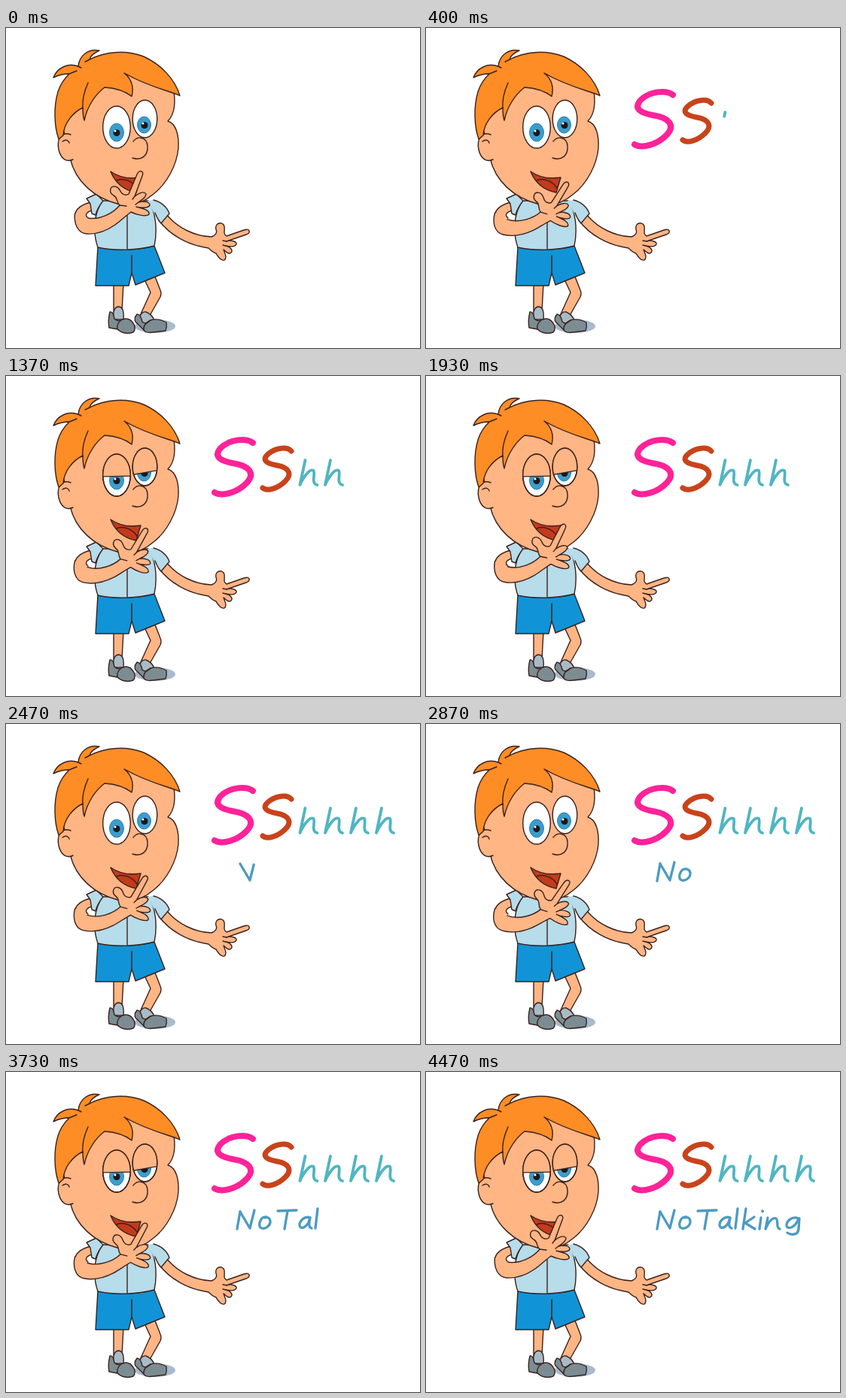
Recreate the animation shown at these times as an HTML page. Size 550 px wide and 426 px high, loop 4970 ms.

```html
<!DOCTYPE html>
<html lang="en">
<head>
<meta charset="utf-8">
<title>Sshhhh, no talking</title>
<style>
html, body { margin: 0; width: 100%; height: 100%; overflow: hidden; background: #fff; }
svg { display: block; width: 100%; height: 100%; }
.line { stroke: #3b211c; stroke-width: 1.4; stroke-linecap: round; stroke-linejoin: round; fill: none; }
.line .skin { fill: #ffb584; }
.line .hair { fill: #ff8d25; }
.line .shirt { fill: #b7dcea; }
.line .shorts { fill: #1193d7; }
.line .shoe { fill: #7b8d93; }
.line .sock { fill: #a9bcc6; }
.line .white { fill: #fff; }
.iris { fill: #3b9dcd; stroke: #2b7fae; stroke-width: 1; }
.pupil { fill: #1c1718; stroke: none; }
.glint { fill: #fff; stroke: none; }
#writing { fill: none; stroke-linecap: round; stroke-linejoin: round; }
</style>
</head>
<body>
<svg viewBox="0 0 550 426" role="img" aria-label="Sshhhh No Talking">
  <defs>
    <clipPath id="eyeL"><ellipse cx="147" cy="132" rx="18.3" ry="28"/></clipPath>
    <clipPath id="eyeR"><ellipse cx="184.5" cy="121" rx="16.3" ry="25"/></clipPath>
  </defs>

  <ellipse cx="198" cy="397" rx="27" ry="9" fill="#a9bace"/>

  <g class="line">
    <!-- legs and shoes -->
    <path class="skin" d="M143 340V377H154L156 340Z"/>
    <path class="skin" d="M184 335L192 352 178 383 188 388 205 358Q207 353 205 349L198 331Z"/>
    <path class="sock" d="M143 388C142 379 143 372 149 371C155 371 157 377 156 388Z"/>
    <path class="shoe" d="M138 378C136 386 136 394 137 399L148 401C153 406 162 408 169 405C172 402 172 397 169 393C165 387 160 386 155 388C150 391 147 390 144 387C143 382 142 377 138 378Z"/>
    <path d="M148 401C147 396 149 392 153 389"/>
    <path class="sock" d="M177 387C178 381 182 377 186 378C191 380 195 384 197 389L184 396Z"/>
    <path class="shoe" d="M174 381C171 385 170 388 172 391L183 402C185 406 190 406 196 405L212 403Q214 398 213 392C206 388 198 387 192 389C188 393 184 394 181 391C180 386 178 381 174 381Z"/>
    <path d="M183 402C182 396 186 392 192 389"/>

    <!-- pointing arm -->
    <path class="skin" d="M214 249C228 266 250 277 273 278C278 276 281 273 279 268C277 259 288 257 290 264C291 270 288 274 293 277L316 269C325 266 325 273 319 275L293 284C299 282 307 284 306 288C304 292 298 291 292 290C298 291 302 296 299 299C296 302 293 298 289 295C291 300 294 306 290 309C284 310 281 303 279 300C275 299 272 296 269 293C241 289 217 275 203 256Z"/>
    <path d="M293 284L288 283M292 290L288 289"/>

    <!-- clothes -->
    <path class="shorts" d="M122 291C145 297 175 296 197 290L211 326 172 342 167 326 163 343H119Z"/>
    <path d="M167 303V326"/>
    <path class="skin" d="M113 232C100 235 92 241 91.5 250L109 254C104 249 107 245 114 243Z" stroke="none"/>
    <path d="M113 232C100 235 92 241 91.5 250M109 253C104 249 107 245 114 243"/>
    <path class="shirt" d="M128 230C115 250 116 275 122 292C145 297 175 296 197 290C201 272 200 245 189 230Z"/>
    <path d="M161 235V294"/>
    <path class="shirt" d="M120 221L107 227 112 234 114 247 119 249C121 241 125 235 129 230Z"/>
    <path class="shirt" stroke="none" d="M188 230L196 229C205 231 214 238 217 247L206 260 199 251Z"/>
    <path d="M196 229C205 231 214 238 217 247L206 260C202 256 200 251 198 246"/>

    <!-- head -->
    <path class="skin" d="M222 78C226 99 224 115 215 124C226 127 230 143 229 160C227 182 214 207 196 221C182 233 166 239 148 234C117 226 92 204 85 173L74 125L103 65L170 50Z"/>
    <path class="skin" d="M86 142C74 137 67 148 70 162C73 175 81 179 89 175"/>
    <path d="M75 151C79 148 83 149 84 153"/>
    <path class="hair" d="M70 148C64 131 63 105 69 85C72 75 77 68 84 61C76 61 69 63 63 66C68 53 82 46 96 51C97 38 108 27 124 30C117 33 112 38 111 42C132 31 160 29 183 38C205 48 224 67 231 90C219 84 190 79 157 60C167 68 170 79 167 91C158 84 145 80 131 79C119 88 108 104 104 123C102 117 102 112 102 106C88 113 77 127 76 143Z"/>
    <path d="M109 73C104 84 101 95 102 107M84 61L94 57M96 51L100 53M111 42L105 45"/>

    <!-- eyes -->
    <ellipse class="white" cx="147" cy="132" rx="18.3" ry="28"/>
    <ellipse class="white" cx="184.5" cy="121" rx="16.3" ry="25"/>
    <ellipse class="iris" cx="147" cy="139" rx="9.5" ry="12"/>
    <ellipse class="iris" cx="183.5" cy="129" rx="9" ry="11"/>
    <circle class="pupil" cx="147" cy="139.500" r="4.500"/>
    <circle class="pupil" cx="184" cy="129.500" r="4.500"/>
    <circle class="glint" cx="145" cy="137" r="1.500"/>
    <circle class="glint" cx="182" cy="127" r="1.500"/>
    <g id="lids">
      <path class="skin" clip-path="url(#eyeL)" d="M120 100H175V133L120 134Z"/>
      <path class="skin" clip-path="url(#eyeR)" d="M160 90H210V124L160 133Z"/>
      <ellipse cx="147" cy="132" rx="18.3" ry="28"/>
      <ellipse cx="184.5" cy="121" rx="16.3" ry="25"/>
    </g>

    <path class="skin" d="M169 151C175 143 187 145 188 157C189 170 180 177 168 173"/>
    <path fill="#c43a1b" d="M139 191C150 199 165 201 179 199L173 219C157 216 145 206 139 191Z"/>
    <path d="M147 203C157 199 168 204 174 213"/>

    <!-- forearm swinging at the elbow -->
    <g id="arm">
      <path class="skin" d="M91.500 247C90 260 95 273 107 274C122 275 135 269 145 262C152 257 159 250 166 245C172 248 186 252 190 248C191 243 184 241 177 239C182 239 190 240 191 236C191 231 182 230 176 232C180 229 186 226 186 221C184 217 177 219 171 224L181 197C184 190 177 188 174 195L163 221C160 223 156 222 154 220C151 217 151 212 145 211C138 210 136 219 143 223C149 226 146 231 151 236C143 246 125 256 109 253"/>
      <path d="M151 236L160 237M171 224L168 228M176 232L172 235M177 239L173 238"/>
    </g>
  </g>

  <g id="writing"></g>
</svg>

<script>
const LOOP = 4970, LAST = 134, CYCLE = 68;
const PINK = '#ff2299', RUST = '#c9431a', TEAL = '#4fb6c2', BLUE = '#4c9bc1';

// frame within the cycle, share of the full swing
const SWING = [[0, 0], [6, .57], [25, 1], [30, .86], [44, .52], [58, .33], [66, 0], [68, 0]];

const h = x => `M${x + 7} 112L${x} 145C${x + 5} 134 ${x + 13} 123 ${x + 18} 126C${x + 21} 130 ${x + 14} 143 ${x + 23} 145`;

// path, start ms, end ms, colour, width
const STROKES = [
  ['M328 89C319 82 297 84 285 96C275 108 286 113 301 116C322 119 332 129 320 142C308 155 287 161 277 155', 20, 200, PINK, 8],
  ['M379 100C373 93 356 96 347 105C339 113 349 117 360 119C377 122 380 131 371 140C361 150 347 154 341 149', 210, 370, RUST, 7],
  [h(390.5), 370, 800, TEAL, 3.8],
  [h(424), 850, 1200, TEAL, 3.8],
  [h(458), 1450, 1850, TEAL, 3.8],
  [h(492), 1950, 2230, TEAL, 3.8],
  ['M311 186L324 208L330 184', 2270, 2480, BLUE, 3.3],
  ['M311 186L307 209', 2500, 2640, BLUE, 3.3],
  ['M346 193C338 192 335 203 338 207C344 211 352 204 351 198C350 194 348 193 344 194', 2680, 2880, BLUE, 3.3],
  ['M361 185L386 184', 2910, 3010, BLUE, 3.3],
  ['M374 185L370 209', 3020, 3140, BLUE, 3.3],
  ['M404 194C397 191 390 198 390 204C391 211 401 207 404 194', 3150, 3270, BLUE, 3.3],
  ['M404 194C402 202 402 207 406 208', 3300, 3450, BLUE, 3.3],
  ['M414 182L411 208', 3500, 3700, BLUE, 3.3],
  ['M425 182L421 209', 3750, 3840, BLUE, 3.3],
  ['M436 193L424 201L437 209', 3850, 3960, BLUE, 3.3],
  ['M445 194L443 209', 3970, 4030, BLUE, 3.3],
  ['M447 185L447.200 185.500', 4030, 4060, BLUE, 3.6],
  ['M454 194L451 209C455 200 460 193 465 195C469 198 464 207 470 209', 4070, 4210, BLUE, 3.3],
  ['M495 195C486 191 479 199 479 204C480 211 491 207 495 195', 4220, 4330, BLUE, 3.3],
  ['M496 195C495 205 496 213 492 215C488 217 483 216 480 214', 4330, 4460, BLUE, 3.3]
];

const byId = id => document.getElementById(id);
const arm = byId('arm'), lids = byId('lids');

const pens = STROKES.map(([d, from, to, color, width]) => {
  const el = document.createElementNS('http://www.w3.org/2000/svg', 'path');
  const attrs = { d, stroke: color, 'stroke-width': width, pathLength: 1, 'stroke-dasharray': '1 2' };
  for (const key in attrs) el.setAttribute(key, attrs[key]);
  byId('writing').append(el);
  return { el, from, to };
});

function lerpTable(table, x) {
  const i = table.findIndex(row => row[0] > x);
  const [x0, y0] = table[i - 1], [x1, y1] = table[i];
  return y0 + (y1 - y0) * (x - x0) / (x1 - x0);
}

function draw(ms) {
  const step = Math.min(LAST, Math.floor(ms * .03 + .11));
  const phase = step % CYCLE;
  const now = step / .03;
  arm.setAttribute('transform', `rotate(${14 * lerpTable(SWING, phase)} 99 247)`);
  lids.style.visibility = phase >= 28 ? 'visible' : 'hidden';
  for (const { el, from, to } of pens) {
    const done = Math.min(1, (now - from) / (to - from));
    el.style.visibility = done > 0 ? 'visible' : 'hidden';
    el.style.strokeDashoffset = 1 - Math.max(0, done);
  }
}

const start = performance.now();
function tick() {
  draw((performance.now() - start) % LOOP);
  requestAnimationFrame(tick);
}
tick();
</script>
</body>
</html>
```
